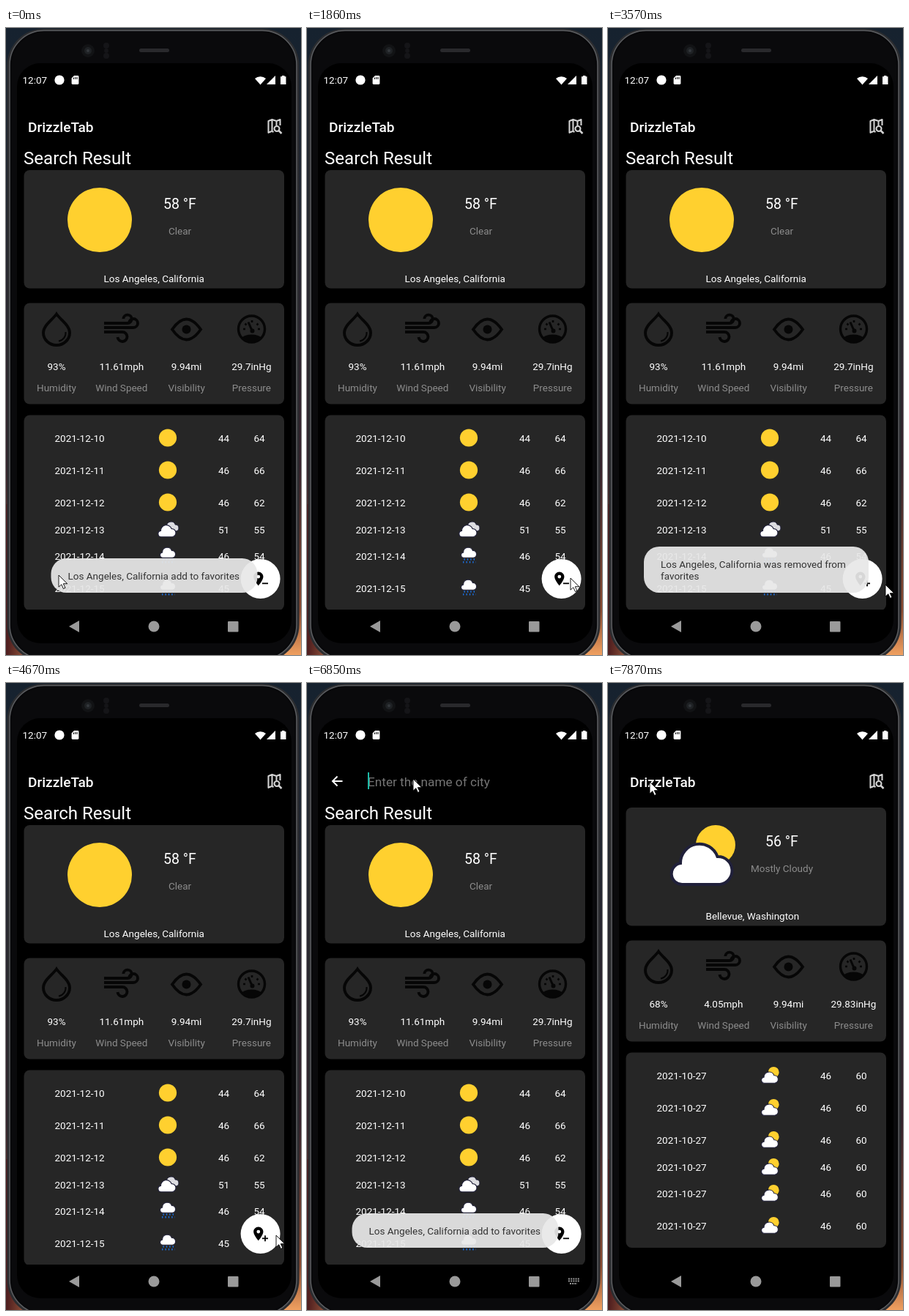
An HTML page for the animation above (8 s loop, 403 by 856 pixels).

```html
<!DOCTYPE html>
<html lang="en">
<head>
<meta charset="utf-8">
<title>Weather screen</title>
<style>
html, body { margin: 0; width: 100%; height: 100%; overflow: hidden; background: #000; }
svg { display: block; width: 403px; height: 856px; font-family: Roboto, "Noto Sans", sans-serif; font-size: 13.5px; }
.mid { text-anchor: middle; }
</style>
</head>
<body>
<svg id="stage" viewBox="0 0 403 856">
  <defs>
    <linearGradient id="wall" x1="0" y1="0" x2="0" y2="1">
      <stop offset="0" stop-color="#16222f"/><stop offset=".3" stop-color="#202430"/>
      <stop offset=".7" stop-color="#35202a"/><stop offset=".93" stop-color="#8a4a30"/>
      <stop offset="1" stop-color="#f0a060"/>
    </linearGradient>
    <linearGradient id="dusk"><stop offset="0" stop-color="#4c1c1e"/><stop offset="1" stop-color="#4c1c1e" stop-opacity="0"/></linearGradient>
    <clipPath id="screen"><rect x="15" y="48" width="375" height="792" rx="32"/></clipPath>
    <clipPath id="content"><rect x="15" y="48" width="375" height="746"/></clipPath>
    <path id="cloud" d="M-26 39A14.6 14.6 0 0 1-29 10A26 26 0 0 1 21.5 1A19.1 19.1 0 0 1 25 39Z" stroke="#20203a" stroke-width="4"/>
    <circle id="sun" r="44" fill="#ffd02f"/>
    <g id="partly"><circle cx="19" cy="-15" r="27" fill="#ffd02f"/><use href="#cloud" fill="#fff"/></g>
    <g id="cloudy"><use href="#cloud" transform="translate(19 -24) scale(.85)" fill="#dcdce0"/><use href="#cloud" transform="translate(-4 -4) scale(1.06)" fill="#fff"/></g>
    <g id="rain">
      <use href="#cloud" transform="translate(0 -26) scale(.92)" fill="#fff"/>
      <path d="M-24 18H40M-29 32H36" stroke="#1b6fe0" stroke-width="9" stroke-dasharray="5 11"/>
    </g>
  </defs>

  <rect width="403" height="856" fill="url(#wall)"/>
  <rect y="650" width="60" height="206" fill="url(#dusk)"/>
  <rect x="1.5" y="1" width="399" height="864" rx="50" fill="#2c2d30"/>
  <rect x="5" y="3.500" width="392" height="858" rx="47" fill="#08080a" stroke="#5c5e61" stroke-width="1.5"/>
  <rect x="8" y="6" width="386" height="853" rx="45" fill="#0a0a0c"/>
  <circle cx="112" cy="31" r="9" fill="#121315"/><circle cx="112" cy="31" r="5" fill="#1f2225"/><circle cx="112" cy="31" r="2" fill="#34383d"/>
  <g fill="#151518"><circle cx="137" cy="24" r="4"/><circle cx="137" cy="31" r="3"/><circle cx="137" cy="38" r="4"/></g>
  <rect x="182" y="28" width="41" height="5" rx="2.5" fill="#29292c"/>
  <rect x="15" y="48" width="375" height="792" rx="32"/>

  <g fill="#fff">
    <text x="22.5" y="76">12:07</text>
    <circle cx="73" cy="71" r="6.6"/>
    <path d="M93 65h5a1.4 1.4 0 0 1 1.4 1.4v9.2A1.4 1.4 0 0 1 98 77h-7a1.4 1.4 0 0 1-1.4-1.4v-7Z"/>
    <path d="M92.5 67.5v2.5M94.8 67v3M97 67v3" stroke="#000"/>
    <path d="M340 69a11.5 11.5 0 0 1 15 0L347.5 77.5Z"/>
    <path d="M368 65v12h-12Z"/>
    <path d="M377 65h3.5v1.3h2v10.7h-7.5v-10.7h2Z"/>
  </g>

  <g id="page" clip-path="url(#content)"></g>

  <g id="bar">
    <text x="30" y="141.5" font-size="19.1" font-weight="500" fill="#fff">DrizzleTab</text>
    <g fill="none" stroke="#d2d2d2" stroke-width="2.1" stroke-linejoin="round">
      <path d="M365.5 142l-2-1.2-5 2V127l5-2 6 2 5-2v8M363.5 125v15.5M369.5 127v6"/>
      <circle cx="370" cy="137.5" r="3.5"/><path d="M372.500 140l4 4" stroke-width="2.5"/>
    </g>
  </g>
  <g id="search">
    <path d="M48.5 134H35.5M41.5 127.5L35 134l6.5 6.5" fill="none" stroke="#fff" stroke-width="2"/>
    <text x="83" y="140.5" font-size="17.2" fill="#757575">Enter the name of city</text>
    <rect x="83" y="122" width="2" height="23" fill="#1cb9a6"/>
  </g>

  <g id="fab">
    <circle cx="347.6" cy="752" r="27" fill="#fff"/>
    <path transform="translate(333.4 740.5) scale(.95)" d="M12 2C8.130 2 5 5.130 5 9c0 5.250 7 13 7 13s7-7.750 7-13c0-3.870-3.130-7-7-7zm0 9.500a2.500 2.500 0 0 1 0-5 2.500 2.500 0 0 1 0 5z"/>
    <path d="M350 758.3h8" stroke="#000" stroke-width="1.8"/>
    <path id="plus" d="M354 754.3v8" stroke="#000" stroke-width="1.8"/>
  </g>

  <g clip-path="url(#screen)">
    <g id="keys"></g>
    <rect id="nav" x="15" y="795" width="375" height="45" fill="#fff"/>
  </g>
  <g fill="#9a9a9a">
    <path id="back" d="M86 817l14-8v16Z"/><path id="down" d="M86 809.5h16l-8 14Z"/>
    <circle cx="202" cy="817" r="7.5"/><rect x="303" y="810" width="14.5" height="14.5" rx="1"/>
    <path id="kbIcon" d="M357 813.500h15M357 816.500h15M359 820h10" stroke="#9a9a9a" stroke-width="2" stroke-dasharray="2 1.2"/>
  </g>

  <g id="added" fill="#333">
    <rect x="61.5" y="724" width="282" height="47" rx="21" fill="#e8e8e8" opacity=".93"/>
    <text x="84.5" y="753">Los Angeles, California add to favorites</text>
  </g>
  <g id="removed" fill="#333">
    <rect x="49" y="708" width="307" height="63" rx="21" fill="#e8e8e8" opacity=".93"/>
    <text x="72" y="737">Los Angeles, California was removed from</text>
    <text x="72" y="753">favorites</text>
  </g>
  <path id="cursor" d="M0 0V16.2L3.8 12.7L6.5 18.5L9 17.3L6.3 11.7H11.8Z" fill="#fff" stroke="#000" stroke-width=".9"/>
</svg>
<script>
const $ = id => document.getElementById(id);
const text = (x, y, s, more = 'fill="#fff" class="mid"') => `<text x="${x}" y="${y}" ${more}>${s}</text>`;
const icon = (name, x, y, k) => `<use href="#${name}" transform="translate(${x} ${y}) scale(${k})"/>`;
const card = (y, h) => `<rect x="24.5" y="${y}" width="355.5" height="${h}" rx="8" fill="#262626"/>`;
const grey = 'fill="#8c8c8c" class="mid"', white = 'fill="#fff"';
const colX = i => 69 + i * 88.8;
const rowY = i => 560 + i * 44 - (i > 2 ? 7 : 0) - (i > 3 ? 8 : 0);

const gauges = `<g fill="none" stroke="#060606" stroke-width="3.9">
  <path d="M69 390.5C63 399 51 406 51 416a18 17 0 0 0 36 0C87 406 75 399 69 390.5Z"/>
  <path d="M81.5 415a11.5 11.5 0 0 1-9.5 12.5" stroke-width="2"/>
  <path d="M134 403H166a5.7 5.7 0 1 0-5.700-6M134 409H174a6 6 0 1 0-6-6M134 415H159a6.500 6.500 0 1 1-6.500 7"/>
  <path d="M227 411.5q19.5-28 39 0q-19.5 28-39 0Z"/>
  <circle cx="335.5" cy="411" r="18" stroke-width="3.4"/>
  <path d="M336.5 414L331 401.500" stroke-width="3"/>
  <path d="M324 411h3M344 411h3M326.5 403.5l2 2M342.5 405.5l2-2M336 399v3" stroke-width="2.6"/>
  <g fill="#060606" stroke="none">
    <circle cx="246.5" cy="411.5" r="6"/><circle cx="336.5" cy="413.5" r="3"/>
    <path d="M322 423q4-4.5 13.5-4.5t13.5 4.5q-5 6.5-13.5 6.5t-13.5-6.5Z"/>
  </g>
</g>`;

function weather(w) {
  const day = ([date, name, lo, hi], i) => {
    const y = rowY(i) + 5;
    return text(66.5, y, date, white) + icon(name, 221, y - 5.5, .275) + text(297.5, y, lo) + text(346, y, hi);
  };
  return card(194, 161.5) + card(375.5, 138) + card(528.5, 266.5)
    + icon(w.icon, 128, w.icon === "sun" ? 262 : 260, 1)
    + text(237.5, 247, w.temp, 'font-size="19.5" fill="#fff" class="mid"')
    + text(237.5, 282, w.sky, grey) + text(133.5, 346.5, w.city, white)
    + gauges
    + w.stats.map((s, i) => text(colX(i), 467, s)).join("")
    + ["Humidity", "Wind Speed", "Visibility", "Pressure"].map((s, i) => text(colX(i), 496, s, grey)).join("")
    + w.days.map(day).join("");
}

const found = weather({
  icon: "sun", temp: "58 °F", sky: "Clear", city: "Los Angeles, California",
  stats: ["93%", "11.61mph", "9.94mi", "29.7inHg"],
  days: [["sun", 44, 64], ["sun", 46, 66], ["sun", 46, 62], ["cloudy", 51, 55], ["rain", 46, 54], ["rain", 45, 54]]
    .map((d, i) => ["2021-12-" + (10 + i), ...d])
});
const home = weather({
  icon: "partly", temp: "56 °F", sky: "Mostly Cloudy", city: "Bellevue, Washington",
  stats: ["68%", "4.05mph", "9.94mi", "29.83inHg"],
  days: Array(6).fill(["2021-10-27", "partly", 46, 60])
});
$("page").innerHTML = `<g id="found">${text(24, 186, "Search Result", 'fill="#fff" font-size="24.1"')}${found}</g>`
  + `<g id="home" transform="translate(0 -24)">${home}</g>`;

function keyboard() {
  const dark = "#cacdd4", top = 602, pitch = 37, wide = 51.5, left = 18.7, right = 334;
  const rowTop = r => top + r * 49;
  const key = (x, r, w = 33, fill = "#fff") => ["#b9bcc2", fill].map((c, i) =>
    `<rect x="${x}" y="${rowTop(r) + 1 - i}" width="${w}" height="39.5" rx="5" fill="${c}"/>`).join("");
  const ink = (n = 20) => `font-size="${n}" fill="#202124" class="mid"`;
  let out = '<rect x="15" y="556" width="375" height="284" fill="#e8eaed"/>';
  ["qwertyuiop", "asdfghjkl", "zxcvbnm"].forEach((row, r) => [...row].forEach((c, i) => {
    const x = left + (i + (10 - row.length) / 2) * pitch;
    out += key(x, r) + text(x + 16.5, rowTop(r) + 27, c, ink(21.5));
    if (!r) out += text(x + 27, top + 12, (i + 1) % 10, 'font-size="9" fill="#5f6368" class="mid"');
  }));
  out += key(left, 2, wide, dark) + key(right, 2, wide, dark)
    + key(left, 3, wide, dark) + key(74.5, 3, 32.5, dark) + key(111, 3)
    + key(148, 3, 144.5) + key(296.8, 3, 32.5, dark) + key(right, 3, wide, "#1a73e8")
    + text(44, 773.5, "?123", ink(13.5)) + text(91, 776, ",", ink()) + text(313, 776, ".", ink());
  // toolbar and key symbols
  return out + `<circle cx="39" cy="577" r="14.5" fill="#fff"/>
    <g fill="none" stroke="#5a5e63" stroke-width="1.9">
      <path d="M41 572l-5 5 5 5" stroke="#333"/>
      <circle cx="86.5" cy="574.5" r="5"/><path d="M90 578.5l6 6"/>
      <path d="M135 569.5h14.5v9.5l-5 5h-9.500ZM138.5 578q3.500 4 7 0M138.5 574h1.5M144 574h1.5" stroke-linejoin="round"/>
      <path d="M243.5 571h12.5v13.5h-12.5ZM247 570h5.5M246.5 575.5h6.5M246.5 578.5h6.5M246.5 581.5h4"/>
      <path d="M283 566v22" stroke="#cdd0d4" stroke-width="1"/>
      <path d="M364.5 576.5a5.5 5.5 0 0 0 11 0M370 582v4"/>
      <path d="M44.5 711l-9 9.5h4.5v7h9v-7h4.5Z" stroke-linejoin="round"/>
      <path d="M354 713h16v14h-16l-6.5-7ZM357.5 716.5l7 7M364.5 716.5l-7 7"/>
      <circle cx="127.5" cy="768" r="8.5"/><path d="M123 770q4.5 6 9 0M124 765.5h2M129 765.5h2"/>
      <g stroke="#fff" stroke-width="2.1"><circle cx="357.5" cy="765.5" r="5"/><path d="M361 769l6 6"/></g>
    </g>
    <rect x="367" y="567.5" width="6" height="12" rx="3" fill="#505459"/>
    <path d="M310.5 577h13" stroke="#505459" stroke-width="3.8" stroke-linecap="round" stroke-dasharray="0 6"/>`
    + text(195, 581.5, "GIF", 'font-size="12.5" font-weight="900" fill="#505459" class="mid"');
}
$("keys").innerHTML = keyboard();

// The recording shows 60 evenly spaced pictures per loop.
const LOOP = 8000, STEP = LOOP / 60;

// Pointer stops: time, x, y; straight travel between them.
const stops = [
  [0, 72, 747], [400, 283, 781], [667, 351, 765], [1067, 357, 761], [1733, 358, 759], [2000, 361, 744],
  [2267, 364, 744], [2533, 389, 744], [2933, 388, 746], [3467, 379, 760], [4267, 379, 761], [4933, 363, 750],
  [5400, 363, 749], [6267, 376, 120], [6467, 376, 121], [6800, 145, 131], [7200, 47, 125], [7867, 57, 135]
];
const ramp = (t, a, b) => Math.min(1, Math.max(0, (t - a) / (b - a)));
const pulse = (t, a, b, c, d) => ramp(t, a, b) - ramp(t, c, d);
const within = (t, a, b) => t >= a && t < b;
const show = (id, on) => $(id).style.display = on ? "" : "none";
const move = (id, x, y) => $(id).setAttribute("transform", `translate(${x} ${y})`);

function pointer(t) {
  const i = Math.max(1, stops.findIndex(s => s[0] >= t));
  const [a, x, y] = stops[i - 1], [b, u, v] = stops[i], k = ramp(t, a, b);
  return [x + (u - x) * k, y + (v - y) * k].map(Math.round);
}

function update(time) {
  const t = Math.min(59, Math.floor((time + 25) / STEP)) * STEP;
  move("cursor", ...pointer(Math.min(t, 7867)));
  $("added").setAttribute("opacity", 1 - ramp(t, 850, 1350) + pulse(t, 4970, 5470, 6900, 7400));
  $("removed").setAttribute("opacity", pulse(t, 2200, 2690, 4270, 4660));

  const typing = within(t, 6900, 7590), searching = within(t, 6530, 7320), atHome = t >= 7700;
  move("keys", 0, 284 * (1 - pulse(t, 6800, 7060, 7340, 7590)));
  show("keys", typing);
  show("nav", typing);
  show("down", typing);
  show("back", !typing);
  show("kbIcon", within(t, 6660, 7590));
  show("search", searching);
  show("bar", !searching);
  show("home", atHome);
  show("found", !atHome);
  show("fab", !atHome);
  show("plus", within(t, 2250, 4900));
}

function tick() {
  update(performance.now() % LOOP);
  requestAnimationFrame(tick);
}
tick();
</script>
</body>
</html>
```
